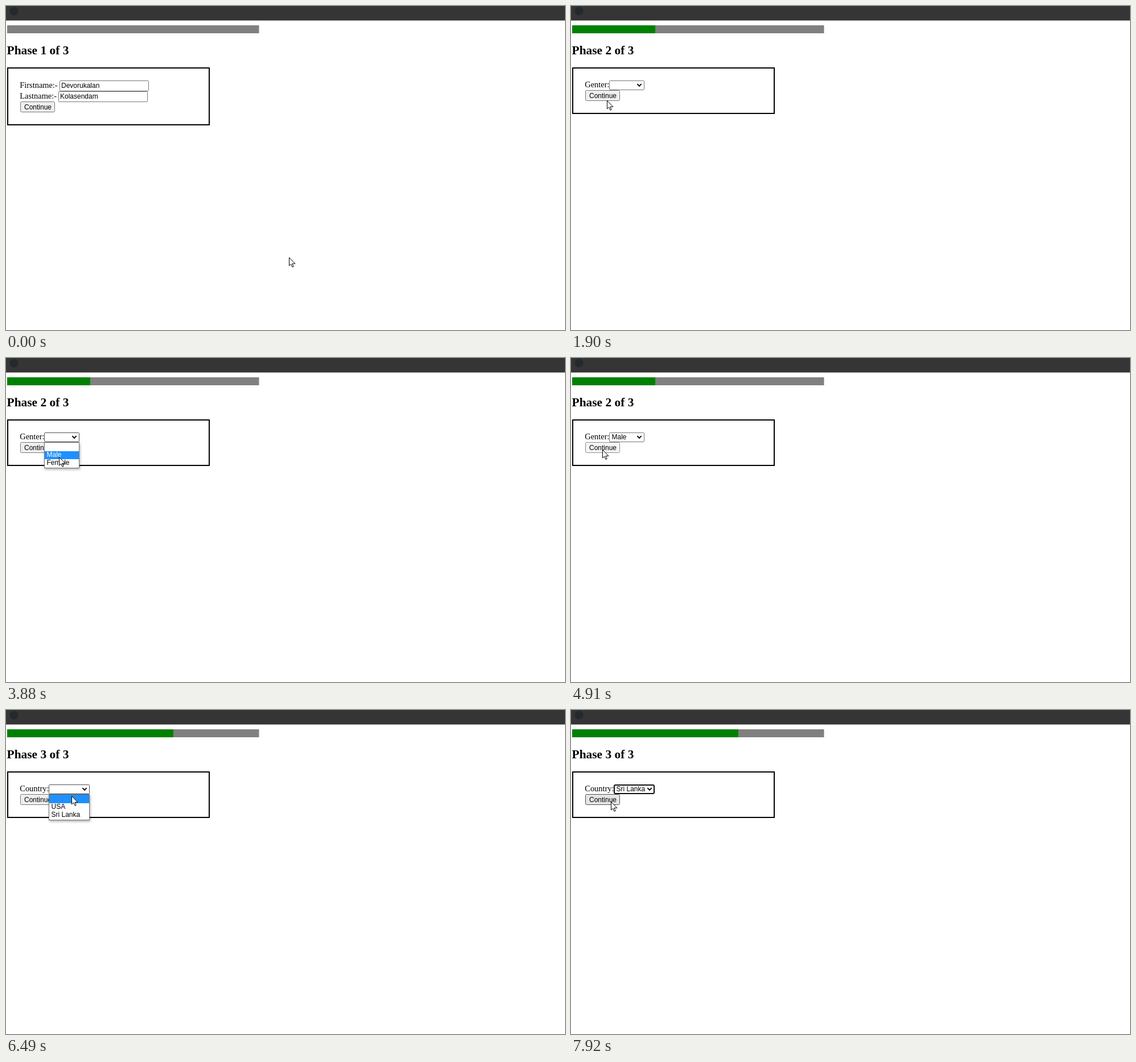
An HTML page for the animation above (8000 ms loop, 982 by 570 pixels).

```html
<!DOCTYPE html>
<html lang="en">
<head>
<meta charset="utf-8">
<title>Three phase form</title>
<style>
  html, body { margin: 0; width: 100%; height: 100%; overflow: hidden; background: #fff; }
  svg { display: block; }
  .serif { font: 14.4px "Liberation Serif", "Times New Roman", serif; }
  .head { font: bold 21.4px "Liberation Serif", "Times New Roman", serif; }
  .ui { font: 12px "Liberation Sans", Arial, sans-serif; }
  .popup { filter: drop-shadow(1px 2px 2px rgba(0, 0, 0, .35)); }
</style>
</head>
<body>
<svg width="982" height="570" viewBox="0 0 982 570">
  <rect width="982" height="25.5" fill="#353535"/>
  <circle cx="14" cy="9" r="7.5" fill="#24292e"/>
  <rect x="2" y="34" width="442.5" height="14" fill="gray"/>
  <rect id="bar" x="2" y="34" height="14" fill="green"/>
  <text id="title" class="head" x="1.6" y="85"></text>
  <rect id="frame" x="3" y="109" width="354" fill="none" stroke="#000" stroke-width="2"/>
  <g id="form"></g>
  <path id="cursor" d="M.5 .5V15L3.7 12L6 17.3L8.2 16.4L5.9 11.3H10.9Z" fill="#fff" stroke="#000"/>
</svg>
<script>
const LOOP = 8000, STEP = 70, LEFT = 24.3, TOP = 131;

// pointer moves: start time, number of steps, x and y reached
const moves = [
  [0, 1, 497, 442], [70, 2, 107, 220], [330, 7, 62, 182],
  [1900, 1, 63, 166], [1980, 6, 98, 139],
  [3060, 2, 96, 157], [3230, 3, 94, 180], [3710, 4, 93, 172], [4440, 2, 55, 161],
  [5500, 6, 115, 140], [6490, 3, 114, 174], [6800, 3, 113, 188], [7430, 7, 70, 161]
];

const phases = [
  { start: 0, press: 1130 },
  { start: 1170, press: 4910, label: "Genter:", x: 67, w: 62,
    open: 2680, close: 4360, options: ["", "Male", "Female"], pick: 1 },
  { start: 5080, press: LOOP, label: "Country:", x: 75, w: 72,
    open: 6090, close: 7350, options: ["", "USA", "Sri Lanka"], pick: 2 }
];

const buttonStyle = {
  idle: ["#efefef", "#767676"],
  hover: ["#e5e5e5", "#4f4f4f"],
  active: ["#f5f5f5", "#8d8d8d"]
};

const $ = id => document.getElementById(id);
const rowTop = i => Math.round(149 + i * 44 / 3);
const inside = ([x, y, w, h], [px, py]) =>
  px >= x && px < x + w && py >= y && py < y + h - 1;

const text = (x, y, s, cls = "ui", fill = "#000") =>
  `<text class="${cls}" x="${x}" y="${y}" fill="${fill}">${s}</text>`;

const outline = ([x, y, w, h], fill, stroke, r = 0, sw = 1) =>
  `<rect x="${x + sw / 2}" y="${y + sw / 2}" width="${w - sw}" height="${h - sw}" rx="${r}" ` +
  `fill="${fill}" stroke="${stroke}" stroke-width="${sw}"/>`;

function pointer(t) {
  let x = 0, y = 0;
  for (const [start, steps, tx, ty] of moves) {
    if (t < start) break;
    const k = Math.min(1, (Math.floor((t - start) / STEP) + 1) / steps);
    x += (tx - x) * k;
    y += (ty - y) * k;
  }
  return [Math.round(x), Math.round(y)];
}

function button(box, state) {
  return outline(box, ...buttonStyle[state], 2) + text(box[0] + 7, box[1] + 14, "Continue");
}

function field(label, value, x, y) {
  return text(LEFT, y + 13, label, "serif") +
    outline([x, y, 157, 19], "#fff", "#767676", 1) +
    text(x + 3, y + 13, value);
}

function select({ x, w, label, options, pick, press, close }, t, open, tip) {
  const box = [x, TOP, w, 17];
  const chosen = t >= close;
  const dark = open || inside(box, tip);
  return text(LEFT, TOP + 12, label, "serif") +
    (chosen && t < press
      ? outline(box, "#fff", "#101010", 2, 2)
      : outline(box, "#fff", dark ? "#4f4f4f" : "#767676", 1)) +
    (chosen ? text(x + 4.5, TOP + 12, options[pick]) : "") +
    `<path d="M${x + w - 12.6} ${TOP + 6.2}l3.6 3.6l3.6 -3.6" fill="none" stroke="#000" stroke-width="1.9"/>`;
}

function popup({ x, w, options }, py) {
  const hot = py >= rowTop(2) ? 2 : py >= rowTop(1) ? 1 : 0;
  const items = options.map((s, i) => {
    const y = rowTop(i), h = rowTop(i + 1) - y;
    return i === hot
      ? outline([x + 1, y, w - 2, h], "#1e90ff", "#1e90ff") + text(x + 4.5, y + 10, s, "ui", "#fff")
      : text(x + 4.5, y + 10, s);
  });
  return `<g class="popup">${outline([x, 148, w, 46], "#fff", "#767676")}${items.join("")}</g>`;
}

let shown = "";

function draw(t) {
  const tip = pointer(t);
  const n = phases.filter(p => p.start <= t).length - 1;
  const p = phases[n];
  const open = t >= p.open && t < p.close;
  const box = [25, n ? 148 : 168, 61, 19];
  const state = t >= p.press ? "active" : !open && inside(box, tip) ? "hover" : "idle";

  const fields = n
    ? select(p, t, open, tip)
    : field("Firstname:-", "Devorukalan", 94, TOP) +
      field("Lastname:-", "Kolasendam", 92, TOP + 19);
  const html = fields + button(box, state) + (open ? popup(p, tip[1]) : "");

  if (html !== shown) {
    $("form").innerHTML = shown = html;
    $("title").textContent = `Phase ${n + 1} of 3`;
    $("bar").setAttribute("width", n * 146);
    $("frame").setAttribute("height", box[1] - 68);
  }
  $("cursor").setAttribute("transform", `translate(${tip})`);
}

const begin = performance.now();
function tick() {
  draw((performance.now() - begin) % LOOP);
  requestAnimationFrame(tick);
}
tick();
</script>
</body>
</html>
```
